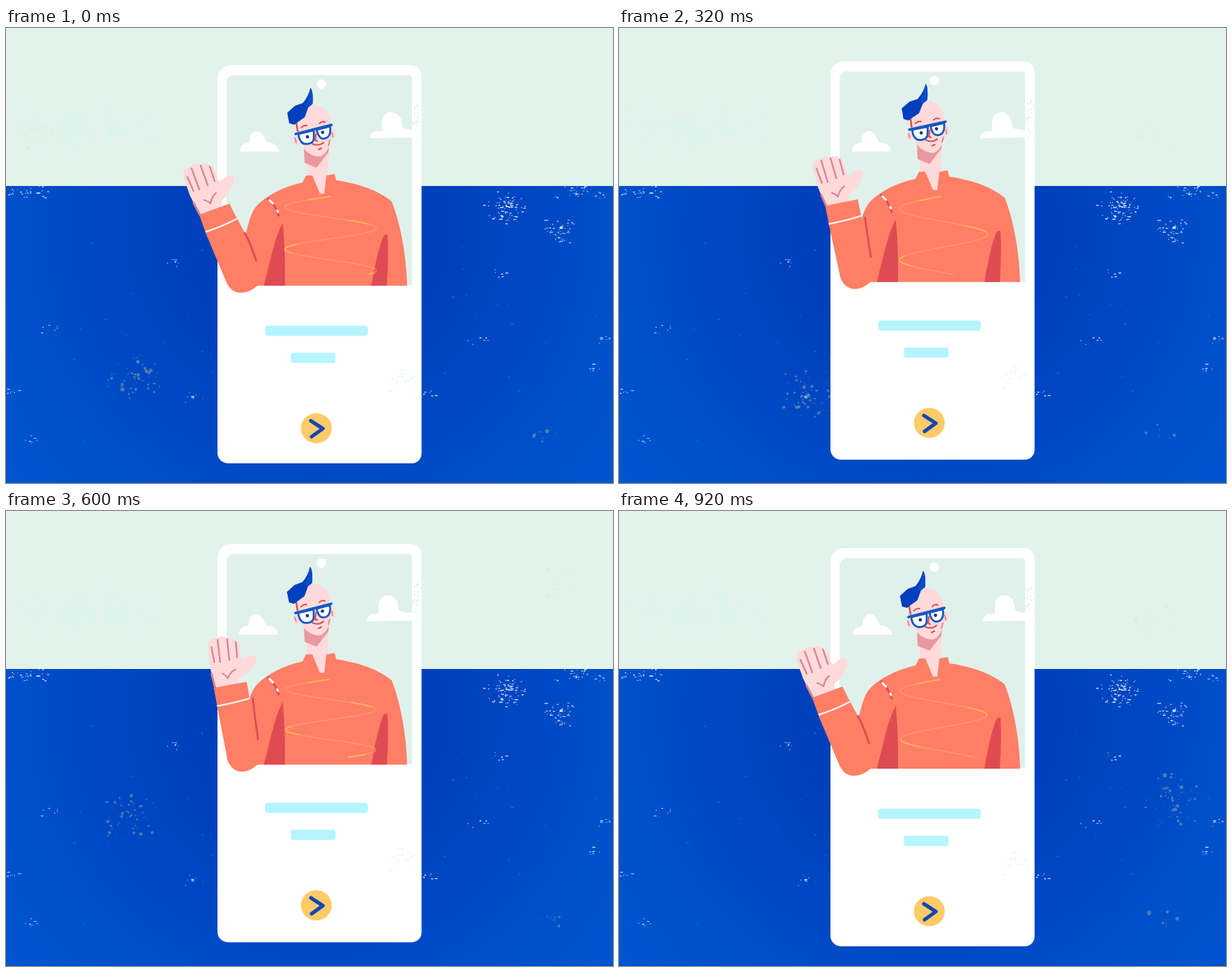
These frames come from a looping animation (864x648 px, 960 ms). An HTML page with a canvas:

```html
<!DOCTYPE html>
<html lang="en">
<head>
<meta charset="utf-8">
<title>Waving hello</title>
<style>
html, body { margin: 0; width: 100%; height: 100%; overflow: hidden; background: #e2f3ec; }
canvas { display: block; width: 864px; height: 648px; }
</style>
</head>
<body>
<canvas id="stage" width="864" height="648"></canvas>
<script>
const g = document.getElementById('stage').getContext('2d');
const LOOP = 960, STEP = 40, HORIZON = 225;
const C = {
  sky: '#e2f3ec', screen: '#e0f1eb', white: '#fff', coral: '#ff7f66', red: '#df4b52',
  skin: '#ffdadb', pink: '#d9838c', shade: '#e9989f', hair: '#003fbd', frame: '#1459c4',
  cyan: '#b5f5ff', gold: '#ffcb69', mark: '#1246b4',
  scratch: 'rgba(235,247,255,.85)', dust: 'rgba(125,160,165,.55)', pollen: 'rgba(250,228,160,.5)'
};

// Drawing helpers
const fill = (d, color) => { g.fillStyle = color; g.fill(new Path2D(d)); };
const line = (d, color, width) => {
  g.strokeStyle = color; g.lineWidth = width;
  g.stroke(new Path2D(d));
};
const dot = (x, y, rx, color, ry = rx) => {
  g.fillStyle = color;
  g.beginPath(); g.ellipse(x, y, rx, ry, 0, 0, 7); g.fill();
};
const box = (x, y, w, h, r, color) => {
  g.fillStyle = color;
  g.beginPath(); g.roundRect(x, y, w, h, r); g.fill();
};
const group = (draw, dx = 0, dy = 0, deg = 0, px = 0, py = 0) => {
  g.save();
  g.translate(px + dx, py + dy);
  g.rotate(deg * Math.PI / 180);
  g.translate(-px, -py);
  draw();
  g.restore();
};
const mix = (a, b, k) => {
  const to = b.match(/-?\d+/g);
  let i = 0;
  return a.replace(/-?\d+/g, n => +n + (to[i++] - n) * k);
};

// Waves over one loop, peaking at the given time
const wave = (t, peak) => Math.cos(2 * Math.PI * (t - peak) / LOOP);
const pulse = (t, peak) => 0.5 + 0.5 * wave(t, peak);

// Seeded grain
const random = seed => () => {
  seed = (seed * 1664525 + 1013904223) >>> 0;
  return seed / 4294967296;
};
const spots = (r, x, y, w, h, n, color, size) => {
  for (let i = 0; i < n; i++)
    dot(x + (r() + r() - 1) * w, y + (r() + r() - 1) * h, 0.5 + r() * r() * size, color);
};
const scratches = (r, x, y, w, h, n, color = C.scratch) => {
  g.fillStyle = color;
  for (let i = 0; i < n; i++)
    g.fillRect(x + (r() + r() - 1) * w, y + (r() + r() - 1) * h, 0.8 + r() * r() * 5, 0.7 + r());
};

// One patch of dust and one of pollen for each of the four textures
const GRAIN = [
  { dust: [185, 500], pollen: [48, 145] },
  { dust: [178, 435], pollen: [778, 100] },
  { dust: [268, 518], pollen: [765, 155] },
  { dust: [785, 410], pollen: [766, 155] }
];

const ARM_OUT = 'M275 266L318 250L324 262L341 294L357 332L358 367C352 372 345 377 333 377C322 376 317 370 312 358L285 294Z';
const ARM_UP = 'M297 257L344 249L348 272L353 296L359 332L358 367C352 372 345 377 335 377C325 376 318 370 315 358L304 296Z';

function backdrop(skin) {
  const fixed = random(17), loose = random(51 + skin), grain = GRAIN[skin];
  g.fillStyle = C.sky;
  g.fillRect(0, 0, 864, HORIZON);
  spots(fixed, 100, 142, 130, 45, 150, 'rgba(212,247,238,.25)', 10);
  spots(loose, ...grain.pollen, 35, 32, 18, C.pollen, 3);

  const blue = g.createRadialGradient(440, 290, 140, 440, 290, 560);
  blue.addColorStop(0, '#003eba');
  blue.addColorStop(0.4, '#0047c3');
  blue.addColorStop(0.75, '#0051cb');
  blue.addColorStop(1, '#0055d0');
  g.fillStyle = blue;
  g.fillRect(0, HORIZON, 864, 648 - HORIZON);

  scratches(fixed, 712, 256, 34, 26, 90);
  scratches(fixed, 785, 287, 26, 20, 50);
  for (const x of [30, 820]) scratches(fixed, x, 234, 45, 10, 30);
  for (let i = 0; i < 12; i++)
    scratches(fixed, fixed() * 864, 320 + fixed() * 320, 16, 9, 7);
  scratches(fixed, 432, 440, 430, 200, 90, 'rgba(70,140,225,.5)');
  spots(loose, ...grain.dust, 45, 42, 60, C.dust, 3);
  spots(loose, 770, 578, 30, 18, 8, C.dust, 3.5);
}

function phone() {
  const r = random(9);
  box(301, 53, 290.5, 567, [19, 15, 14, 15], C.white);
  box(314, 67, 264, 299, [10, 5, 0, 0], C.screen);
  spots(r, 585, 138, 8, 34, 45, C.sky, 1.6);
  scratches(r, 562, 502, 26, 20, 30, '#e4f5f1');
  dot(449, 80, 6.7, C.white);
}

function clouds(k) {
  group(() => fill('M333 176C333 170 336 165 343 164C346 164 347 163 347 158C348 148 358 143 364 150C368 154 369 159 372 163C380 162 388 168 389 176Z', C.white), -1.5 * k);
  group(() => fill('M518 157C519 150 524 146 530 147C536 147 536 145 535 138C534 127 540 120 548 120C558 120 563 128 563 136C563 143 567 145 585 145L585 156Z', C.white), -5 * k);
}

function head() {
  dot(413, 160, 4, C.skin, 7);
  dot(465, 151, 4, C.skin, 7);
  fill('M414 135C414 117 428 107 442 110C456 113 461 125 463 140L463 158C460 172 454 182 446 183C437 183 426 177 422 169C416 162 414 150 414 135Z', C.skin);
  line('M413 135L415 147', C.red, 2.5);
  line('M411 157L413 163M464 149L465 155M461 160L459 167', C.pink, 1.8);
  fill('M400 121L411 111L422 107Q430 98 433 85Q437 89 436 108L430 113L425 127L410 138L403 136Z', C.hair);
  fill('M433 86Q437 90 436 108L430 113L425 111Q431 99 433 86Z', '#0b4cc6');
  line('M420 142Q424 138 428 139M446 136Q450 132 454 134', C.red, 2);
  for (const d of ['M416 151L438 146L438 158Q437 164 430 165Q418 167 416 151Z',
                   'M442 145L461 140Q463 152 457 156Q446 162 442 145Z']) {
    fill(d, C.white);
    line(d, C.frame, 2.8);
  }
  line('M412 151L463 138', C.frame, 3.6);
  dot(429, 155, 2.4, '#123a8c');
  dot(450.5, 148.5, 2.4, '#123a8c');
  line('M441 151L440 160L443 161', C.red, 2.2);
  line('M436 165Q445 169 452 163M445 173L449 171', C.red, 2);
}

function torso() {
  fill('M427 210L422 220C395 226 372 238 358 252C348 262 345 280 341 294L357 330L340 367L571 367C570 325 562 280 549 247C530 231 500 221 470 217L468 208L456 210L453 236L447 236L436 210Z', C.coral);
  fill('M394 278C383 296 376 333 367 367L397 367Q398 320 394 278Z', C.red);
  fill('M543 294L538 295C530 312 525 340 520 367L542 367Q545 325 543 294Z', C.red);
  line('M373 243Q383 251 388 267', C.red, 3);
  line('M375 245L380 250M386 260L387 262', C.white, 3);
}

function hand() {
  fill('M276 267L262 239L253 214C251 205 254 199 260 199C263 199 264 195 270 194C275 193 276 196 278 194C284 191 289 193 291 197C296 198 298 204 300 210C301 216 303 220 306 218C312 210 321 207 325 214C324 225 319 235 307 246L306 257Z', C.skin);
  line('M267 249L276 266', C.pink, 3);
  line('M258 212L267 232M264 200L275 230M277 196L287 224M290 197L297 218', C.pink, 2.3);
  line('M282 245Q289 247 291 250Q293 239 299 235', C.pink, 2.1);
}

function arm(k, tilt) {
  // The wrist follows the cuff as the forearm swings.
  group(hand, 24 * k, -5 * k, tilt, 297, 258);
  fill(mix(ARM_OUT, ARM_UP, k), C.coral);
  line(mix('M340 292Q349 309 356 331', 'M352 272Q355 303 359 331', k), C.red, 2.8);
  line(mix('M285 290Q307 283 328 272', 'M302 283Q326 279 347 273', k), '#fff0ec', 2.4);
}

// A loose zigzag across the shirt
function scribble(skin) {
  const r = random(71 + skin * 13), phase = r() * 6, turns = 3 + r(), reach = 60 + r() * 12;
  let d = '';
  for (let u = 0; u <= 1; u += 0.01) {
    const x = 462 + reach * Math.cos(phase + Math.PI * turns * u);
    d += `${d ? 'L' : 'M'}${x} ${240 + 112 * u}`;
  }
  line(d, 'rgba(255,172,110,.5)', 1.8);
  g.setLineDash([30, 130]);
  line(d, '#f9b956', 1.6);
  g.setLineDash([]);
}

function controls() {
  box(369, 424, 146, 14.5, 4, C.cyan);
  box(405.5, 462.5, 63.5, 14.5, 3, C.cyan);
  dot(441.7, 570, 22, C.gold, 21.5);
  line('M434 559.5L451 570.5L435 582', C.mark, 5.2);
}

function draw(t) {
  const c = pulse(t, LOOP / 2), k = c * c * (3 - 2 * c);
  const skin = Math.floor(t / 120) % 4, lift = -6.2 * k;
  g.lineCap = g.lineJoin = 'round';
  backdrop(skin);
  group(phone, 0, lift);
  clouds(k);
  group(() => {
    fill('M425 168L429 210L436 210L447 236L453 236L458 208L460 160Z', C.skin);
    fill('M424 170L460 164L459 177L442 199L425 192Z', C.shade);
    group(head, 0, 0, 0.6 + 1.4 * wave(t, 280), 442, 190);
    torso();
    arm(k, 14 * pulse(t, 560) ** 2);
  }, 0, lift);
  scribble(skin);
  group(controls, 0, -9 * k);
}

function tick() {
  draw(Math.floor(performance.now() % LOOP / STEP) * STEP);
  requestAnimationFrame(tick);
}
tick();
</script>
</body>
</html>
```
